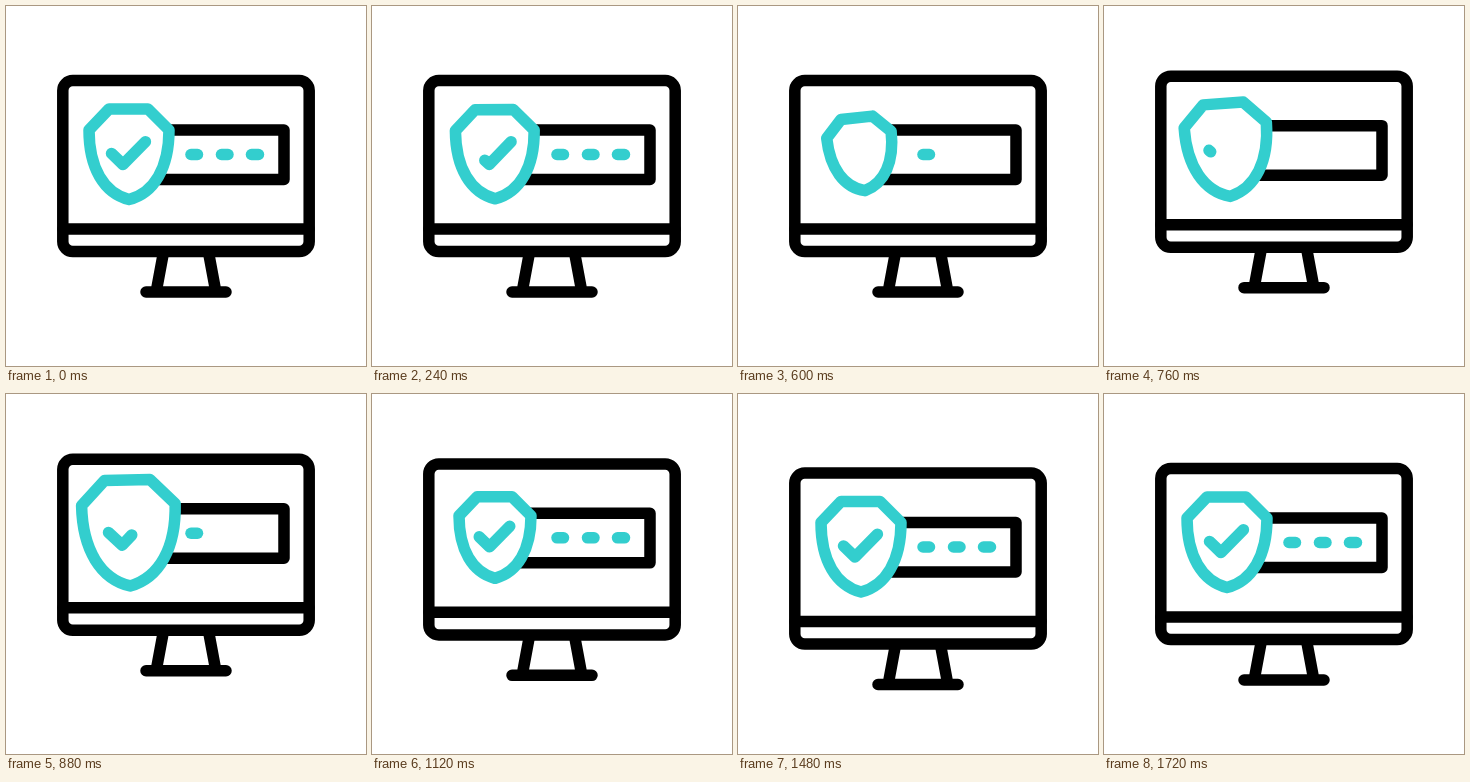
An HTML page that plays this animation: 360x360 px, repeating every 2040 ms.

```html
<!DOCTYPE html>
<html lang="en">
<head>
<meta charset="utf-8">
<title>Secure login</title>
<style>
  html, body { margin: 0; width: 100%; height: 100%; overflow: hidden; background: #fff; }
  svg { display: block; width: 100%; height: 100%; }
  path, rect {
    fill: none; stroke: #000; stroke-width: 11.5; stroke-linecap: round; stroke-linejoin: round;
    vector-effect: non-scaling-stroke;
  }
  .teal { stroke: #33cece; }
  .filled { fill: #fff; }
</style>
</head>
<body>
<svg viewBox="0 0 360 360">
  <g id="monitor">
    <rect x="56.8" y="74.6" width="246.400" height="171" rx="10"/>
    <path d="M57 223H303M157 249L150.500 284M203 249L209.500 284M140 286H220"/>
    <path d="M130 124H278V173.500H130"/>
    <path class="teal dash" d="M185 148.500H191.500"/>
    <path class="teal dash" d="M215.500 148.500H222"/>
    <path class="teal dash" d="M245.500 148.500H252.500"/>
    <g id="shield">
      <path class="teal filled" d="M-20-45H19L40-24C40 14 25 39 0 45.500C-25 39-40 14-40-24Z"/>
      <path class="teal" id="check"/>
    </g>
  </g>
</svg>
<script>
const LOOP = 2040, STEP = 40;
const byId = id => document.getElementById(id);
const monitor = byId('monitor'), shield = byId('shield'), check = byId('check');
const dashes = document.querySelectorAll('.dash');

// Each key is [time, value]
const lift = [[600, 0], [960, -10.5], [1360, 6.5], [1680, 0]];
const scale = [[160, 1], [600, 0.81], [880, 1.17], [1120, 0.9], [1320, 1]];
const tilt = [[160, 0], [600, -6.2], [1000, 0]];
const erase = [[120, 0], [520, 1]];
const write = [[720, 0], [1010, 1]];
const dashHidden = [[640, 800], [480, 920], [360, 1040]];
const checkPoints = [[-17.5, -0.6], [-6, 10.5], [16.4, -12.3]];

function tween(keys, t) {
  if (t <= keys[0][0]) return keys[0][1];
  for (let i = 1; i < keys.length; i++) {
    const [t0, a] = keys[i - 1], [t1, b] = keys[i];
    if (t < t1) return a + (b - a) * (1 - Math.cos(Math.PI * (t - t0) / (t1 - t0))) / 2;
  }
  return keys[keys.length - 1][1];
}

// Path data for the part of a polyline between two fractions of its length
function trim(points, from, to) {
  if (to - from < 0.01) return '';
  const lengths = points.slice(1).map((p, i) => Math.hypot(p[0] - points[i][0], p[1] - points[i][1]));
  const total = lengths.reduce((a, b) => a + b);
  const at = fraction => {
    let rest = fraction * total, i = 0;
    while (i < lengths.length - 1 && rest > lengths[i]) rest -= lengths[i++];
    const k = rest / lengths[i];
    return points[i].map((v, axis) => v + (points[i + 1][axis] - v) * k);
  };
  const bend = lengths[0] / total;
  const middle = from < bend && to > bend ? [points[1]] : [];
  return 'M' + [at(from), ...middle, at(to)].join('L');
}

function draw(now) {
  const t = Math.floor(now % LOOP / STEP) * STEP;
  monitor.setAttribute('transform', `translate(0 ${tween(lift, t)})`);
  shield.setAttribute('transform',
    `translate(123 148) rotate(${tween(tilt, t)}) scale(${tween(scale, t)})`);
  check.setAttribute('d', t < 640
    ? trim(checkPoints, tween(erase, t), 1)
    : trim(checkPoints, 0, tween(write, t)));
  dashes.forEach((dash, i) => {
    const [off, on] = dashHidden[i];
    dash.style.visibility = t >= off && t < on ? 'hidden' : 'visible';
  });
}

const start = performance.now();
function tick() {
  draw(performance.now() - start);
  requestAnimationFrame(tick);
}
tick();
</script>
</body>
</html>
```
